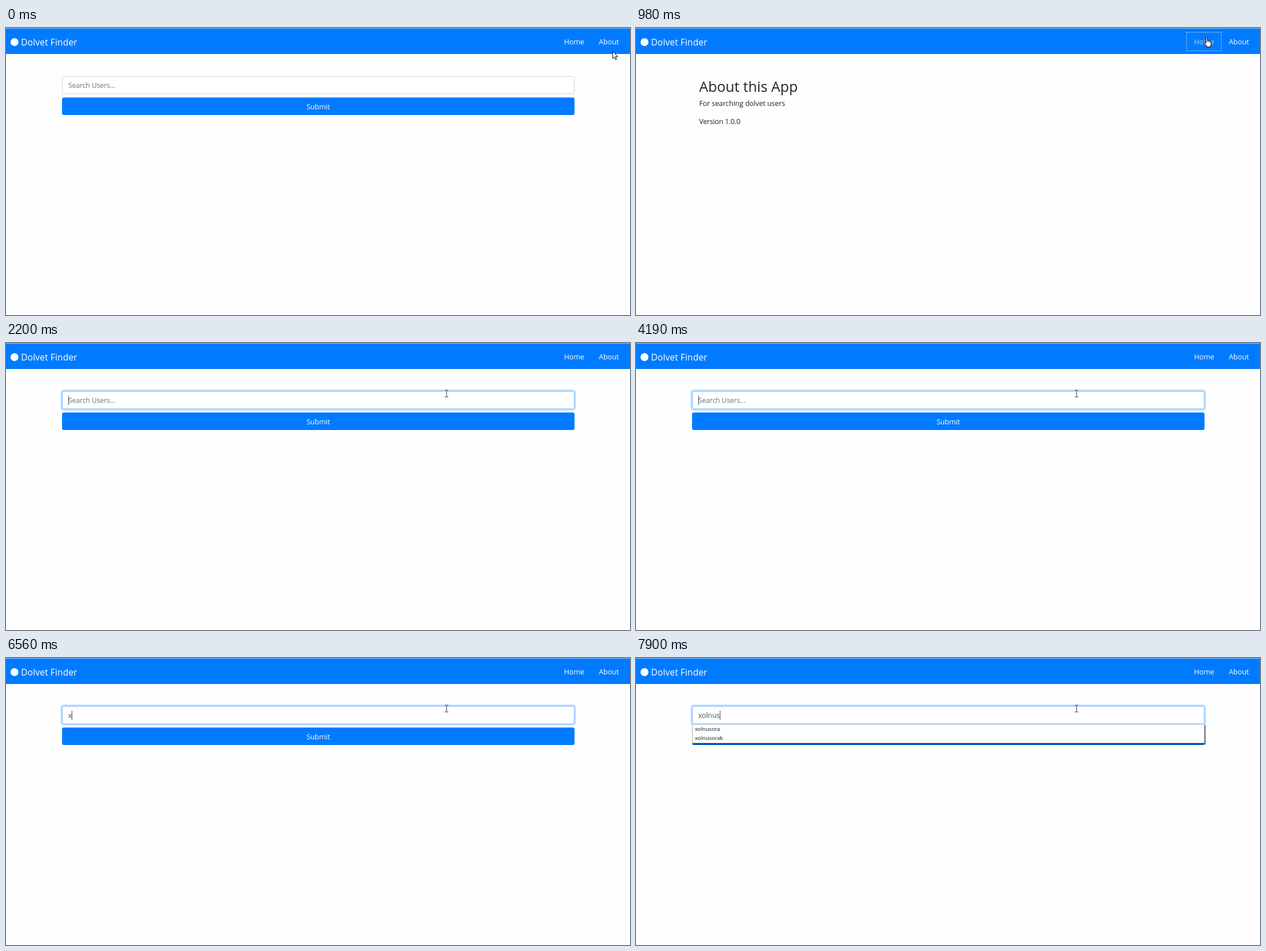
Animation of 1102x508 px, one loop 8 s. Source, as an HTML page:

```html
<!DOCTYPE html>
<html lang="en">
<head>
<meta charset="utf-8">
<title>Dolvet Finder</title>
<style>
  html, body { margin: 0; width: 100%; height: 100%; overflow: hidden; }
  body {
    position: relative; background: #fefefe; color: #212529;
    font: 12.6px/20px "Open Sans", "Noto Sans", sans-serif;
  }
  body *, .cursor { position: absolute; box-sizing: border-box; white-space: nowrap; }
  .anim { animation: 8s step-end infinite; }

  nav { left: 0; top: 0; width: 100%; height: 46px; background: #007bff; border-top: 1px solid #a4c4e6; color: #fff; }
  .logo { left: 8px; top: 17px; width: 14px; height: 14px; border-radius: 50%; background: #fff; }
  .brand { left: 26.5px; top: 14px; font-size: 15.75px; letter-spacing: .1px; }
  .link { top: 14px; }
  .focus { top: 6px; height: 34px; border: 1px dotted rgba(255, 255, 255, .75); }

  .field {
    left: 99px; top: 85px; width: 905px; height: 32px;
    border: 1px solid #ced4da; border-radius: 3.3px; background: #fff;
    animation-name: field;
  }
  .hint { left: 110px; top: 92px; color: #6c757d; letter-spacing: -.22px; animation-name: hint; }
  .typed {
    left: 110px; top: 93px; height: 17px; line-height: 18px; overflow: hidden;
    box-sizing: content-box; color: #495057; border-right: 1px solid;
    letter-spacing: -.1px; animation-name: typed, caret;
  }
  .typed span { position: static; }
  .submit {
    left: 99px; top: 123px; width: 905px; height: 31px; border-radius: 3.3px;
    background: #007bff; color: #fff; line-height: 33px; text-align: center;
  }
  .list {
    left: 99px; top: 117px; width: 905px; height: 34px; background: #fff; color: #111;
    border: 1px solid #a9afb6; border-top-color: #c4cbd2;
    box-shadow: 2px 2px 1px rgba(0, 0, 0, .5);
    font-size: 9.6px; line-height: 16px; animation-name: list;
  }
  .list div { left: 4px; }

  .home { inset: 0; animation-name: homePage; }
  .about { inset: 0; animation-name: aboutPage; }
  h1 { margin: 0; left: 111.5px; top: 83px; font-size: 25.3px; line-height: 40px; font-weight: 400; }
  p { margin: 0; left: 111.5px; letter-spacing: -.08px; }

  .cursor { left: 0; top: 0; overflow: visible; animation-name: move; }
  .arrow { animation-name: arrow; }
  .hand { animation-name: hand; }
  .beam { animation-name: beam; }

  @keyframes aboutPage { 0% { visibility: hidden } 6.125% { visibility: visible } 13.75%, 100% { visibility: hidden } }
  @keyframes homePage { 0% { opacity: 1 } 6.125% { opacity: 0 } 13.75%, 100% { opacity: 1 } }
  @keyframes aboutHover { 0% { color: #fff } 1.5% { color: #bdcbdc } 7.625%, 100% { color: #fff } }
  @keyframes homeHover { 0% { color: #fff } 7.625% { color: #bdcbdc } 21.5%, 100% { color: #fff } }
  @keyframes aboutFocus { 0% { opacity: 0 } 3% { opacity: 1 } 12.25%, 100% { opacity: 0 } }
  @keyframes homeFocus { 0% { opacity: 0 } 12.25% { opacity: 1 } 26%, 100% { opacity: 0 } }

  @keyframes field {
    0% { border-color: #ced4da; box-shadow: none }
    26% { border-color: #a7caed; box-shadow: 0 0 0 1.3px rgba(0, 123, 255, .13) }
    27.5%, 100% { border-color: #80bdff; box-shadow: 0 0 0 2.6px rgba(0, 123, 255, .25) }
  }
  @keyframes hint { 0% { opacity: 1 } 82%, 100% { opacity: 0 } }
  @keyframes list { 0% { opacity: 0 } 83.5%, 100% { opacity: 1 } }
  @keyframes typed {
    0% { width: 0 }
    82% { width: 6px }
    86.625% { width: 14px }
    89.625% { width: 17px }
    91.125% { width: 25px }
    94.125% { width: 32px }
    98.75%, 100% { width: 38px }
  }
  @keyframes caret {
    0%, 32.125%, 46.125%, 58.625%, 72.625% { border-color: transparent }
    26%, 39.875%, 52.375%, 66.375%, 78.875%, 100% { border-color: #495057 }
  }

  @keyframes move {
    0% { transform: translate(1071px, 41px) }
    1.5% { transform: translate(1061px, 34px) }
    3% { transform: translate(1049px, 26px) }
    7.625% { transform: translate(1027px, 21px) }
    9.125% { transform: translate(1008px, 16px) }
    16.875% { transform: translate(1019px, 19px) }
    20% { transform: translate(1004px, 30px) }
    21.5% { transform: translate(955px, 53px) }
    23% { transform: translate(888px, 69px) }
    24.5% { transform: translate(815px, 87px) }
    26%, 100% { transform: translate(778px, 90px) }
  }
  @keyframes arrow { 0% { opacity: 1 } 1.5% { opacity: 0 } 21.5% { opacity: 1 } 24.5%, 100% { opacity: 0 } }
  @keyframes hand { 0% { opacity: 0 } 1.5% { opacity: 1 } 21.5%, 100% { opacity: 0 } }
  @keyframes beam { 0% { opacity: 0 } 24.5%, 100% { opacity: 1 } }
</style>
</head>
<body>
  <nav>
    <div class="logo"></div>
    <div class="brand">Dolvet Finder</div>
    <div class="link anim" style="left:985.5px;animation-name:homeHover">Home</div>
    <div class="link anim" style="left:1047px;animation-name:aboutHover">About</div>
    <div class="focus anim" style="left:972px;width:62px;animation-name:homeFocus"></div>
    <div class="focus anim" style="left:1033px;width:63px;animation-name:aboutFocus"></div>
  </nav>

  <main class="home anim">
    <div class="field anim"></div>
    <div class="hint anim">Search Users...</div>
    <div class="typed anim"><span>xolnus</span></div>
    <div class="submit">Submit</div>
    <div class="list anim">
      <div style="top:0">xolnusora</div>
      <div style="top:16px">xolnusorak</div>
    </div>
  </main>

  <main class="about anim">
    <h1>About this App</h1>
    <p style="top:124px">For searching dolvet users</p>
    <p style="top:156px;letter-spacing:-.22px">Version 1.0.0</p>
  </main>

  <svg class="cursor anim" width="1" height="1" fill="#fff" stroke="#000" stroke-linejoin="round">
    <path class="arrow anim" d="M.5 .5V13L3.4 10.4L5.5 15.2L7.5 14.3L5.4 9.6H9.4Z"/>
    <g class="hand anim" transform="translate(-5)">
      <path d="M3.5 11V1.9Q3.5 .5 4.75 .5T6 1.9V6Q8 5.3 8.2 6.6Q10.2 6 10.4 7.4Q12.5 7 12.5 8.8V12.5Q12.5 14.5 11.3 16V17.5H5V16Q3.5 14.5 .8 10.5Q.3 9 1.6 8.9Q2.6 9 3.5 11Z"/>
      <path fill="none" stroke-width=".8" d="M6 6V9M8.2 6.6V9.2M10.4 7.4V9.5"/>
    </g>
    <path class="beam anim" fill="none" stroke="#333" d="M-3 -6.5H-.5M.5 -6.5H3M0 -6V6M-3 5.5H-.5M.5 5.5H3"/>
  </svg>
</body>
</html>
```
